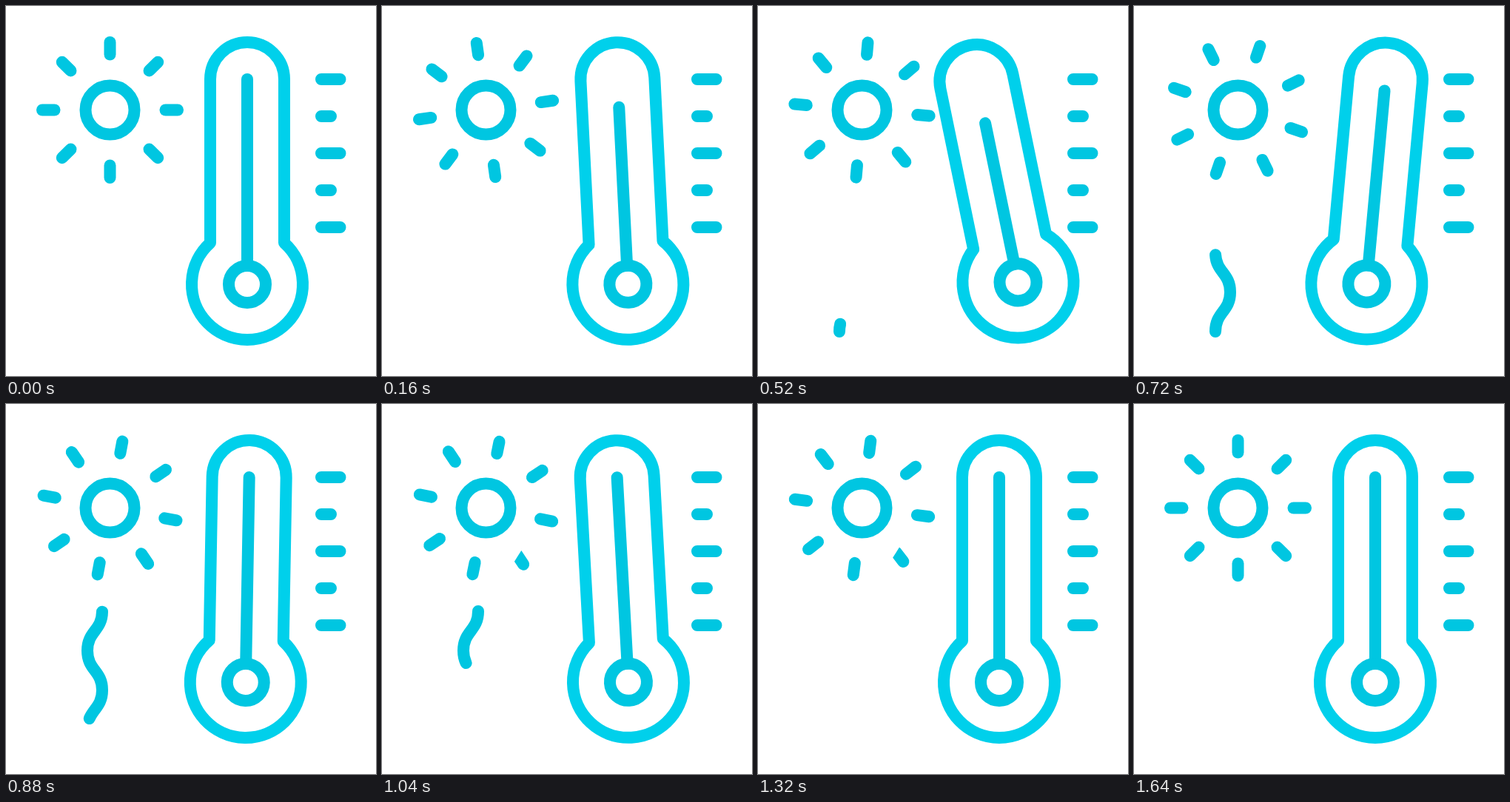
Animation of 500 by 500 pixels, one loop 2000 ms. Source, as an HTML page:

```html
<!DOCTYPE html>
<html>
<head>
<meta charset="utf-8">
<style>
  html, body { margin: 0; width: 100%; height: 100%; overflow: hidden; background: #fff; }
  svg { display: block; width: 100%; height: 100%; }
</style>
</head>
<body>
<svg viewBox="0 0 500 500" fill="none" stroke="#00c6e1" stroke-width="16" stroke-linecap="round" stroke-linejoin="round">
  <path d="M426 99h25.500M426 149h13M426 199h25.500M426 249h13M426 299h25.500"/>
  <circle cx="140.500" cy="140.500" r="33"/>
  <g id="rays"></g>
  <path id="notch" d="M192 192L178.500 213.500L166 202L181 183Z" fill="#fff" stroke="none"/>
  <path id="wave" pathLength="1" d="M110 440c0-26.700 20-26.700 20-53.300s-20-26.700-20-53.400s20-26.700 20-53.300"/>
  <g id="thermometer">
    <path stroke="#00d0eb" d="M276 320.100V99a50 50 0 0 1 100 0V320.100A75 75 0 1 1 276 320.100Z"/>
    <path id="mercury"/>
    <circle cx="326" cy="376" r="25"/>
  </g>
</svg>
<script>
const LOOP = 2000, STEP = 40;
const [rays, notch, wave, thermometer, mercury] =
  ['rays', 'notch', 'wave', 'thermometer', 'mercury'].map(id => document.getElementById(id));

// Keys are [time, value, speed]; a missing speed means the key is at rest.
const spin = [[0, 0], [160, 8, .12], [520, 85, .3], [720, 161, .36], [1040, 258.6, .245], [1320, 307.6, .065], [1640, 315]];
const tilt = [[0, 0], [500, -12], [750, 6], [1000, -3.4], [1250, 0]];
const level = [[0, 99], [333, 179], [867, 99]];
const waveHead = [[455, 0], [895, 1]];
const waveTail = [[800, 0], [1240, 1]];

function track(keys, t) {
  if (t <= keys[0][0]) return keys[0][1];
  const i = keys.findIndex(key => key[0] > t);
  if (i < 0) return keys[keys.length - 1][1];
  const [t0, v0, s0 = 0] = keys[i - 1], [t1, v1, s1 = 0] = keys[i];
  const d = t1 - t0, u = (t - t0) / d, w = 1 - u;
  return v0 + (v1 - v0) * u * u * (3 - 2 * u) + d * u * w * (s0 * w - s1 * u);
}

for (let a = 0; a < 360; a += 45)
  rays.innerHTML += `<path d="M140.500 49V65.500" transform="rotate(${a} 140.500 140.500)"/>`;

function draw(t) {
  rays.setAttribute('transform', `rotate(${-track(spin, t)} 140.500 140.500)`);
  notch.style.display = t > 880 && t < 1600 ? '' : 'none';

  const head = track(waveHead, t), tail = track(waveTail, t);
  wave.style.display = head > tail ? '' : 'none';
  wave.setAttribute('stroke-dasharray', `${head - tail} 2`);
  wave.setAttribute('stroke-dashoffset', -tail);

  thermometer.setAttribute('transform', `rotate(${track(tilt, t)} 326 250)`);
  mercury.setAttribute('d', `M326 ${track(level, t)}V351`);
}

function tick() {
  const t = performance.now() % LOOP;
  draw(Math.floor(t / STEP) * STEP);
  requestAnimationFrame(tick);
}
tick();
</script>
</body>
</html>
```
